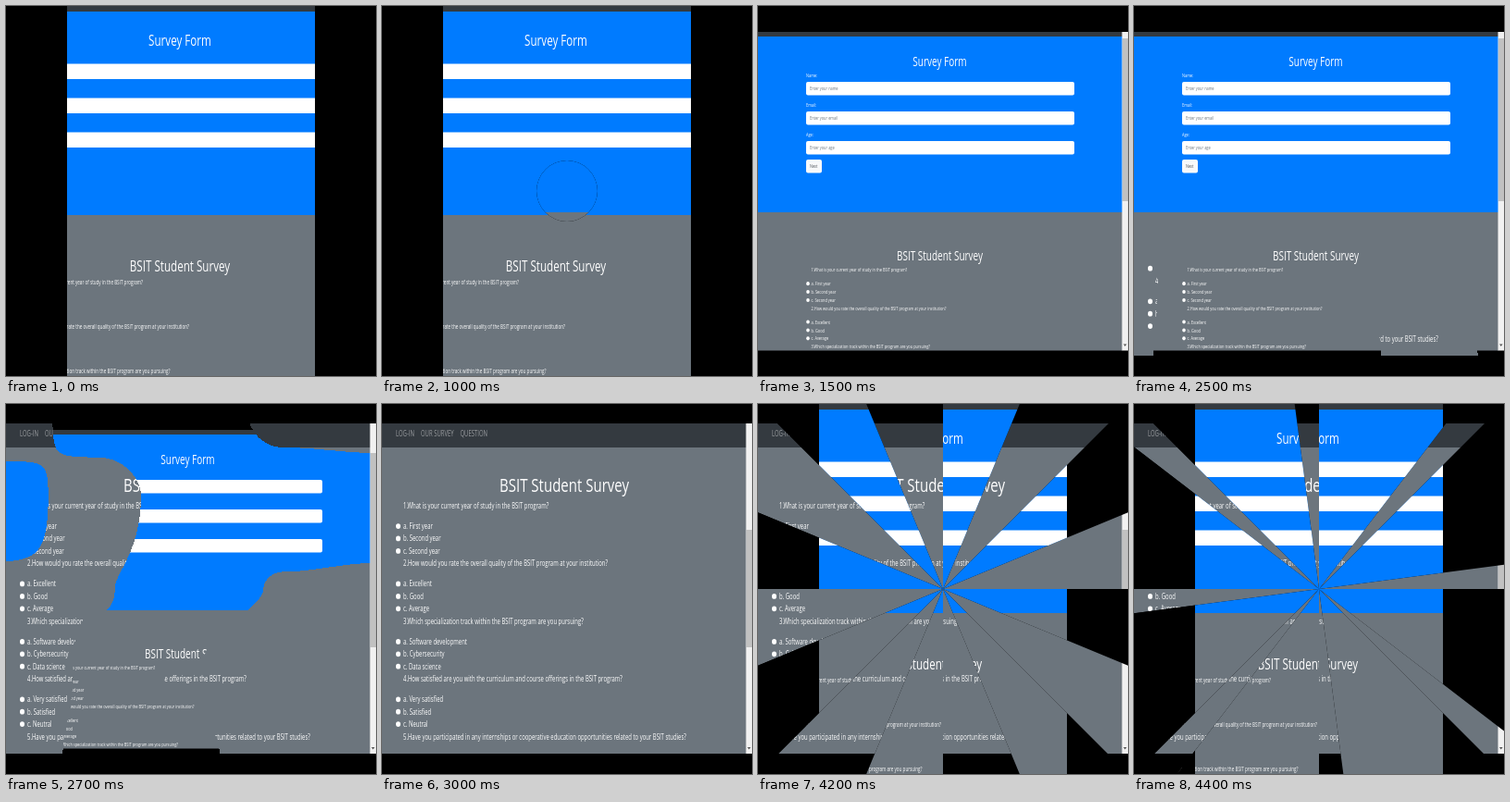
Recreate the animation shown at these times as an HTML page. Size 400x400 px, loop 4500 ms.

```html
<!DOCTYPE html>
<html lang="en">
<head>
<meta charset="utf-8">
<title>Survey slides</title>
<style>
  html, body { margin: 0; width: 100%; height: 100%; overflow: hidden; background: #000; }
  svg { display: block; width: 100vw; height: 100vh; }
  text { font-family: "Open Sans", "Noto Sans", sans-serif; white-space: pre; }
</style>
</head>
<body>
<svg id="stage" viewBox="0 0 400 400">
  <defs><clipPath id="reveal"><path id="revealPath"/></clipPath></defs>
  <g id="under"></g>
  <g id="over" clip-path="url(#reveal)"></g>
</svg>
<script>
const BLUE = '#007bff', GRAY = '#6c757d', DARK = '#343a40', WHITE = '#fff';
const LOOP = 4500, STEP = 100, STEPS = 6;

const questions = [
  ['1.What is your current year of study in the BSIT program?', 'a. First year', 'b. Second year', 'c. Second year'],
  ['2.How would you rate the overall quality of the BSIT program at your institution?', 'a. Excellent', 'b. Good', 'c. Average'],
  ['3.Which specialization track within the BSIT program are you pursuing?', 'a. Software development', 'b. Cybersecurity', 'c. Data science'],
  ['4.How satisfied are you with the curriculum and course offerings in the BSIT program?', 'a. Very satisfied', 'b. Satisfied', 'c. Neutral'],
  ['5.Have you participated in any internships or cooperative education opportunities related to your BSIT studies?']
];

const rect = (x, y, w, h, fill, r = 0) =>
  `<rect x="${x}" y="${y}" width="${w}" height="${h}" fill="${fill}" rx="${r}"/>`;

// Slides are squeezed horizontally, so their lettering is too.
const writer = squeeze => (x, y, size, str, { fill = WHITE, anchor = 'start', weight = 400 } = {}) =>
  `<text transform="translate(${x} ${y}) scale(${squeeze} 1)" font-size="${size}" fill="${fill}" text-anchor="${anchor}" font-weight="${weight}">${str}</text>`;

const title = { anchor: 'middle', weight: 500 };

function scrollbar(top, bottom, thumbTop, thumbBottom) {
  return rect(393.5, top, 6.5, bottom - top, '#f1f1f1') +
    rect(394, thumbTop, 6, thumbBottom - thumbTop, '#c1c1c1') +
    `<path d="M395 ${bottom - 7}h3.6l-1.8 2.6z" fill="#555"/>`;
}

function questionList(text, list, { x, radioX, radio, size, y, firstGap, gap, period }) {
  return list.map(([question, ...options], i) => {
    const top = y + i * period;
    return text(x, top, size, question) + options.map((option, j) => {
      const line = top + firstGap + j * gap;
      return `<ellipse cx="${radioX}" cy="${line - size * .36}" rx="${radio}" ry="${radio * 1.15}" fill="#fff"/>` +
        text(x, line, size, option);
    }).join('');
  }).join('');
}

function zoomedSlide() {
  const text = writer(.705), end = { anchor: 'end' };
  return rect(0, 0, 400, 400, '#000') + rect(66, 0, 268, 6, DARK) +
    rect(66, 6, 268, 220, BLUE) + rect(66, 226, 268, 174, GRAY) +
    [62.5, 99.5, 136.5].map(y => rect(66, y, 268, 16.5, WHITE)).join('') +
    text(188, 42.5, 16.5, 'Survey Form', title) +
    text(188, 287, 16.5, 'BSIT Student Survey', title) +
    text(148, 300.8, 6.5, questions[0][0], end) +
    text(198, 349.2, 6.5, questions[1][0], end) +
    text(177.5, 397.4, 6.5, questions[2][0], end) +
    rect(0, 0, 66, 400, '#000');
}

function formSlide() {
  const text = writer(.69);
  const fields = [['Name:', 'Enter your name'], ['Email:', 'Enter your email'], ['Age:', 'Enter your age']];
  return rect(0, 0, 400, 400, '#000') + rect(0, 28, 394, 5, DARK) +
    rect(0, 33, 394, 190, BLUE) + rect(0, 223, 394, 149.5, GRAY) +
    scrollbar(28, 372.5, 35, 211) +
    text(196.5, 65, 14.5, 'Survey Form', title) +
    fields.map(([label, hint], i) => {
      const y = 82 + i * 32;
      return text(52, y - 5, 5.7, label) + rect(52, y, 290, 14.5, WHITE, 2) +
        text(56, y + 9.4, 5.7, hint, { fill: GRAY });
    }).join('') +
    rect(52, 166, 17, 14.5, '#f8f9fa', 2) + text(56, 175.4, 5.7, 'Next', { fill: '#555b61' }) +
    text(196.5, 275, 14.5, 'BSIT Student Survey', title) +
    questionList(text, [questions[0], questions[1], questions[2].slice(0, 1)],
      { x: 57.5, radioX: 54, radio: 1.8, size: 5.7, y: 287.2, firstGap: 15, gap: 8.9, period: 41.4 });
}

function surveySlide() {
  const text = writer(.733), faded = { fill: '#999c9f' };
  return rect(0, 0, 400, 400, '#000') + rect(0, 21, 394, 26, DARK) +
    rect(0, 47, 394, 331, GRAY) + scrollbar(21, 378, 136, 263) +
    text(15, 35, 8.1, 'LOG-IN', faded) + text(42, 35, 8.1, 'OUR SURVEY', faded) +
    text(84.5, 35, 8.1, 'QUESTION', faded) +
    text(197, 94.5, 20.5, 'BSIT Student Survey', title) +
    questionList(text, questions,
      { x: 23, radioX: 17.5, radio: 2.5, size: 8.1, y: 113, firstGap: 22, gap: 13.4, period: 62.4 });
}

function circle(p) {
  const r = 283 * p ** 1.2;
  return `M${200 - r} 200a${r} ${r} 0 1 1 ${2 * r} 0a${r} ${r} 0 1 1 ${-2 * r} 0z`;
}

function spokes(p) {
  const point = turn => {
    const a = turn * Math.PI / 4;
    return `${200 + 400 * Math.cos(a)} ${200 + 400 * Math.sin(a)}`;
  };
  return Array.from({ length: 8 }, (_, i) => `M200 200L${point(i)}L${point(i + p)}z`).join('');
}

// Value noise on a 100-unit lattice; everything below the threshold is revealed.
const lattice = [
  [.15, .85, .95, .25, .2],
  [.67, .28, .78, .8, .75],
  [.453, .48, .72, .47, .44],
  [.08, .6, .475, 0, .25],
  [.1, .72, .68, 0, .2]
];
const smooth = f => f * f * (3 - 2 * f);
const mix = (a, b, u) => a + (b - a) * u;

function blobs(p) {
  let d = '';
  for (let y = 0; y < 400; y++) {
    const j = Math.floor(y / 100), v = smooth((y + .5) / 100 - j);
    const row = lattice[j].map((a, i) => mix(a, lattice[j + 1][i], v));
    let start = -1;
    for (let x = 0; x <= 400; x++) {
      const i = Math.floor(x / 100);
      const inside = x < 400 && mix(row[i], row[i + 1], smooth((x + .5) / 100 - i)) < p;
      if (inside && start < 0) start = x;
      if (!inside && start >= 0) {
        d += `M${start} ${y}H${x}V${y + 1}H${start}z`;
        start = -1;
      }
    }
  }
  return d;
}

const slides = [zoomedSlide(), formSlide(), surveySlide()];
const scenes = [
  { at: 0, wipe: circle },
  { at: 1500, wipe: blobs },
  { at: 3000, wipe: spokes }
];
const HOLD = 1000;
const [under, over, revealPath] = ['under', 'over', 'revealPath'].map(id => document.getElementById(id));
let shownScene = -1, shownStep = -1;

function draw(time) {
  const t = time % LOOP;
  const index = Math.floor(t / 1500);
  const { at, wipe } = scenes[index];
  const step = t - at < HOLD ? 0 : Math.min(STEPS, Math.floor((t - at - HOLD) / STEP) + 1);
  if (index === shownScene && step === shownStep) return;
  if (index !== shownScene) {
    under.innerHTML = slides[index];
    over.innerHTML = slides[(index + 1) % slides.length];
  }
  revealPath.setAttribute('d', step ? wipe(step / STEPS) : '');
  shownScene = index;
  shownStep = step;
}

const begin = performance.now();
function tick() {
  draw(performance.now() - begin);
  requestAnimationFrame(tick);
}
tick();
</script>
</body>
</html>
```
